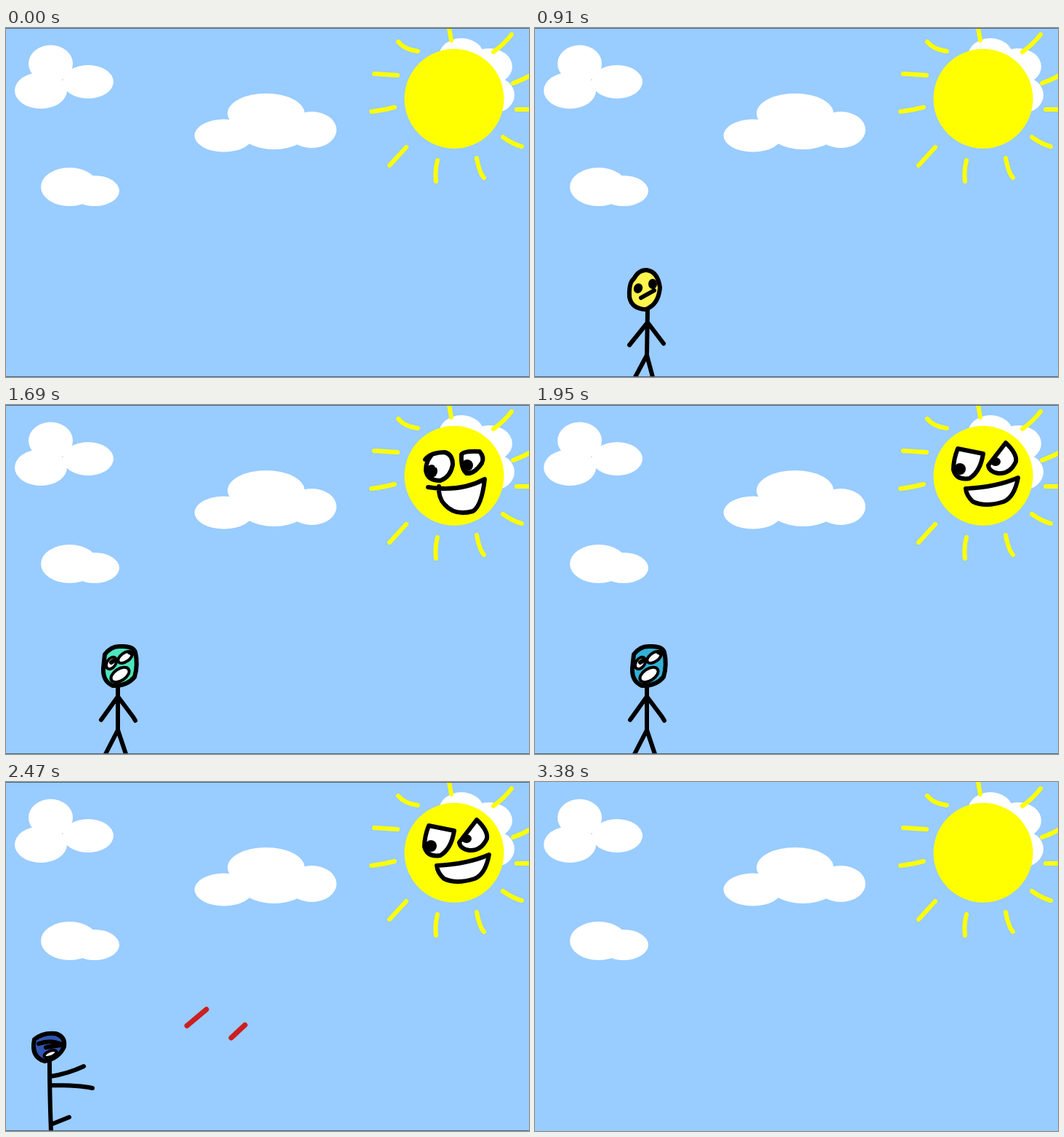
An HTML page that plays this animation: 720x480 px, repeating every 3770 ms.

```html
<!DOCTYPE html>
<html lang="en">
<head>
<meta charset="utf-8">
<title>Sunny day</title>
<style>
  html, body { margin: 0; width: 100%; height: 100%; overflow: hidden; background: #9cf; }
  svg { display: block; width: 100%; height: 100%; }
  .ray { fill: none; stroke: #ff0; stroke-width: 6; stroke-linecap: round; }
  .ink { fill: none; stroke: #000; stroke-width: 6; stroke-linecap: round; stroke-linejoin: round; }
  .skin { fill: currentColor; }
  .white { fill: #fff; }
  .dot { fill: #000; stroke: none; }
  .thin { stroke-width: 4; }
  .pose, .face { display: none; }
  .on { display: inline; }
  #beams { fill: none; stroke: #cc1f1f; stroke-width: 7; stroke-linecap: round; }
</style>
</head>
<body>
<svg viewBox="0 0 720 480">
  <rect width="720" height="480" fill="#9cf"/>
  <g class="white">
    <ellipse cx="61.5" cy="49" rx="30.5" ry="25.5"/>
    <ellipse cx="48" cy="86" rx="36" ry="25"/>
    <ellipse cx="113" cy="74" rx="35" ry="23"/>
    <ellipse cx="358" cy="117.5" rx="53" ry="27.5"/>
    <ellipse cx="300" cy="148" rx="40.5" ry="22.5"/>
    <ellipse cx="369" cy="138" rx="50" ry="29"/>
    <ellipse cx="421" cy="140" rx="34" ry="25"/>
    <ellipse cx="87.5" cy="218.5" rx="39.5" ry="26.5"/>
    <ellipse cx="122" cy="224" rx="34" ry="21"/>
    <ellipse cx="627" cy="39" rx="31" ry="25"/>
    <ellipse cx="665" cy="53" rx="32" ry="25"/>
    <ellipse cx="671" cy="92" rx="29" ry="25"/>
  </g>
  <circle cx="617" cy="97.3" r="68.5" fill="#ff0"/>
  <path class="ray" d="M610 0L613 17M540 19Q549 30 567 32M507 63L539 65M503 115Q520 113 535 109M551 164L528 189M594 182Q590 196 592 211M648 179Q652 200 658 206M684 150Q698 160 710 163M703 112H724M698 76Q712 71 724 64M671 33Q686 22 696 9"/>

  <g id="smirk" class="face ink">
    <path class="white" d="M575 92Q592 82 607 88Q598 97 580 95Z"/>
    <path class="white" d="M626 88Q627 80 645 78Q660 80 659 86Q643 86 627 90Z"/>
    <path style="fill:#000" d="M596 121Q622 125 639 112Q634 126 620 127Q608 127 596 121Z"/>
  </g>
  <g id="grin" class="face ink">
    <path class="white" d="M577 75Q585 65 604 65Q615 68 615 82Q612 99 598 104Q580 104 578 90Q578 78 585 70"/>
    <path class="white" d="M627 68Q630 63 652 64Q659 72 655 80Q645 95 634 94Q626 88 627 68Z"/>
    <path class="white" d="M581 113Q625 120 659 102Q655 138 643 146Q618 153 604 137Q595 128 596 112"/>
    <ellipse class="dot" cx="586" cy="91" rx="8" ry="9"/>
    <ellipse class="dot" cx="635" cy="83" rx="8" ry="8"/>
    <circle class="white" stroke="none" cx="592" cy="84" r="2"/>
  </g>
  <g id="angry" class="face ink">
    <path class="white" d="M582 60L617 67Q613 92 598 101Q580 104 576 89Q576 75 582 60Z"/>
    <path class="white" d="M624 83L648 52Q664 67 662 78Q654 95 638 94Q625 92 624 83Z"/>
    <path class="white" d="M593 115Q635 113 665 100Q660 127 645 133Q620 141 603 133Q594 125 593 115Z"/>
    <ellipse class="dot" cx="585" cy="88" rx="8" ry="8"/>
    <ellipse class="dot" cx="634" cy="78" rx="7" ry="6"/>
  </g>
  <g id="meh" class="face ink">
    <ellipse class="dot" cx="603" cy="80.5" rx="10" ry="6.5" transform="rotate(-14 603 80.5)"/>
    <ellipse class="dot" cx="641.5" cy="78" rx="9.5" ry="5"/>
    <path d="M619 118L634 114"/>
  </g>

  <g id="beams"></g>

  <g id="man" class="ink">
    <g id="walk" class="pose">
      <path class="skin" d="M61 345Q66 339 77 340Q92 340 96 352Q100 366 89 376Q78 385 67 381Q54 374 55 364Q56 354 63 344"/>
      <path d="M67 359L71 358M87 357H88M73 370Q82 374 92 368"/>
      <path d="M75 384Q77 416 81 446M77 406L65 430Q82 433 96 430M81 446Q78 464 71 482M83 448L97 474Q84 478 76 474L68 466"/>
    </g>
    <g id="stand" class="pose">
      <path class="skin" d="M136 345Q143 332 154 333Q169 335 172 357Q170 381 152 387Q133 386 130 370Q129 350 136 345Z"/>
      <ellipse class="dot" cx="142" cy="358" rx="6" ry="7" transform="rotate(25 142 358)"/>
      <ellipse class="dot" cx="162" cy="352" rx="6" ry="7"/>
      <path d="M146 371L164 361"/>
      <path d="M155 387L154 450M130 436L155 405L177 434M138 480L154 450L162 480"/>
    </g>
    <g id="yell" class="pose">
      <path class="skin" d="M136 343Q145 331 158 332Q175 331 178 340Q182 357 177 374Q166 387 147 386Q133 380 134 362Z"/>
      <g class="thin">
        <ellipse class="white" cx="145" cy="355" rx="6" ry="9" transform="rotate(35 145 355)"/>
        <ellipse class="white" cx="164" cy="347" rx="11" ry="6" transform="rotate(-35 164 347)"/>
        <ellipse class="white" cx="157" cy="371" rx="14" ry="8" transform="rotate(-33 157 371)"/>
      </g>
      <path d="M145 354L148 352M170 340L174 342"/>
      <path d="M154 388V447M131 433L154 401L175 429L178 434M137 480L154 447L165 480"/>
    </g>
    <g id="run" class="pose">
      <path class="skin" d="M109 337Q121 329 137 335Q150 345 148 359Q141 378 121 384Q104 382 103 366Q103 349 113 337"/>
      <path d="M109 345L125 341M106 357Q116 347 124 353L142 347M108 351L122 355M128 349L145 352M111 360L122 356"/>
      <ellipse class="white thin" cx="126" cy="369" rx="11" ry="6" transform="rotate(-20 126 369)"/>
      <path d="M120 384Q121 412 119 440L116 480M122 395Q142 388 157 376M122 398Q136 412 138 422L103 423M121 442L100 473Q120 469 137 454"/>
    </g>
    <g id="flee" class="pose">
      <path class="skin" d="M-22 354Q-10 344 7 346Q21 350 19 364Q12 380 -8 384Q-27 378 -22 354Z"/>
      <path d="M-16 360Q0 354 16 361M-6 365L14 362"/>
      <ellipse class="white thin" cx="0" cy="374" rx="9" ry="4" transform="rotate(-22 0 374)"/>
      <path d="M-1 384Q-1 430 1 480M0 405Q25 401 46 391M0 417Q40 417 58 421M1 471L26 461"/>
    </g>
  </g>
  <path id="edges" d="M0 .5H720M0 479.5H720" stroke="#4c6680"/>
</svg>
<script>
const STEP = 130, LOOP = 3770, LAST = 26;
const $ = id => document.getElementById(id);
const ANCHOR = { walk: 76, stand: 152, yell: 152, run: 122, flee: 0 };

// Each entry: first step, value
const POSES = [[0, ''], [1, 'walk'], [7, 'stand'], [12, 'yell'], [16, 'run'], [19, 'flee'], [23, '']];
const FACES = [[0, ''], [8, 'smirk'], [12, 'grin'], [15, 'angry'], [21, 'meh'], [LAST, '']];
const MAN_X = [[1, -2], [4, 76], [7, 152], [15, 152], [17, 122], [21, 0], [23, -62]];
const HUE = [[4, 28], [10, 85], [13, 165], [17, 222]];
const SATURATION = [[10, 100], [13, 75], [17, 58]];
const LIGHT = [[10, 65], [13, 60], [17, 44]];

const pick = (table, step) => table.findLast(([from]) => step >= from)[1];

function tween(keys, step) {
  const next = keys.findIndex(([at]) => at >= step);
  if (next === 0) return keys[0][1];
  if (next < 0) return keys.at(-1)[1];
  const [a, from] = keys[next - 1], [b, to] = keys[next];
  return from + (to - from) * (step - a) / (b - a);
}

function show(kind, id) {
  for (const el of document.querySelectorAll('.' + kind)) el.classList.toggle('on', el.id === id);
}

function beam(x, y, length, degrees) {
  const a = degrees * Math.PI / 180;
  const dx = Math.cos(a) * length / 2, dy = Math.sin(a) * length / 2;
  return `<path d="M${x - dx} ${y + dy}L${x + dx} ${y - dy}"/>`;
}

function beams(step) {
  if (step < 16 || step > 21) return '';
  if (step === 21) return '<path d="M62 488L99 451M130 462Q138 462 149 482M185 468L168 486"/>';
  const n = step - 17;
  return beam(442.5 - 90 * n, 182 + 71 * n, 25 + 5 * n, 34 + 3 * n)
       + beam(481.5 - 81 * n, 217 + 63 * n, 26, 43);
}

function draw(step) {
  const pose = pick(POSES, step);
  show('pose', pose);
  show('face', pick(FACES, step));
  if (pose) {
    $('man').setAttribute('transform', `translate(${tween(MAN_X, step) - ANCHOR[pose]} 0)`);
    $('man').style.color = `hsl(${tween(HUE, step)} ${tween(SATURATION, step)}% ${tween(LIGHT, step)}%)`;
  }
  $('beams').innerHTML = beams(step);
  $('edges').style.display = step === LAST ? 'none' : '';
}

const start = performance.now();
let shown = -1;
function tick() {
  const time = (performance.now() - start) % LOOP;
  const step = Math.min(LAST, Math.floor(time / STEP));
  if (step !== shown) draw(shown = step);
  requestAnimationFrame(tick);
}
tick();
</script>
</body>
</html>
```
